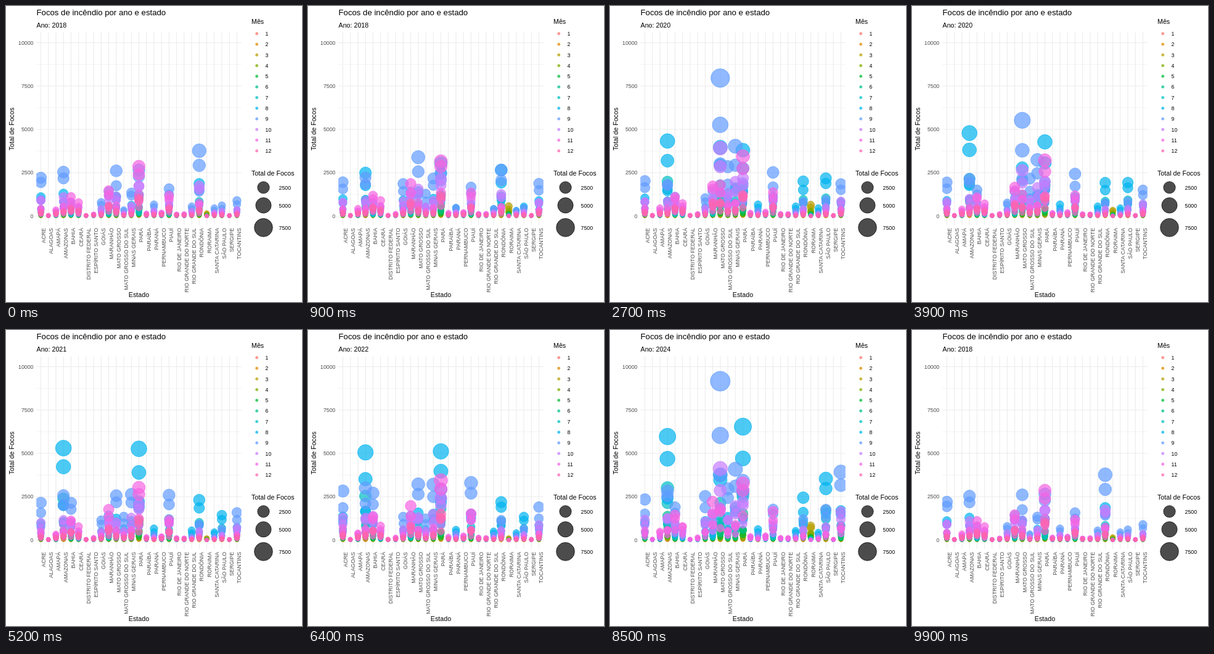
An HTML page for the animation above (10 s loop, 480x480 px).

```html
<!DOCTYPE html>
<html lang="pt">
<head>
<meta charset="utf-8">
<title>Focos de incêndio por ano e estado</title>
<style>
  html, body { margin: 0; width: 100%; height: 100%; overflow: hidden; background: #fff; }
  svg { display: block; width: 480px; height: 480px; font: 10.7px "Liberation Sans", Arial, sans-serif; }
  .title { font-size: 13.2px; }
  .small { font-size: 8.8px; }
  .axis { font-size: 8.8px; fill: #4d4d4d; }
  .end { text-anchor: end; }
  .mid { text-anchor: middle; }
  line { stroke: #ebebeb; stroke-width: 1.07; }
  .minor { stroke-width: .53; }
  .dot { fill-opacity: .7; stroke-opacity: .7; stroke-width: .94; }
</style>
</head>
<body>
<svg viewBox="0 0 480 480">
  <clipPath id="panel"><rect x="49.2" y="43" width="332.6" height="312"/></clipPath>
  <g id="grid"></g>
  <g id="dots" clip-path="url(#panel)"></g>
  <g id="labels"></g>
</svg>
<script>
const STATES = {
  AC: 'ACRE', AL: 'ALAGOAS', AP: 'AMAPÁ', AM: 'AMAZONAS', BA: 'BAHIA', CE: 'CEARÁ',
  DF: 'DISTRITO FEDERAL', ES: 'ESPÍRITO SANTO', GO: 'GOIÁS', MA: 'MARANHÃO',
  MT: 'MATO GROSSO', MS: 'MATO GROSSO DO SUL', MG: 'MINAS GERAIS', PA: 'PARÁ',
  PB: 'PARAÍBA', PR: 'PARANÁ', PE: 'PERNAMBUCO', PI: 'PIAUÍ', RJ: 'RIO DE JANEIRO',
  RN: 'RIO GRANDE DO NORTE', RS: 'RIO GRANDE DO SUL', RO: 'RONDÔNIA', RR: 'RORAIMA',
  SC: 'SANTA CATARINA', SP: 'SÃO PAULO', SE: 'SERGIPE', TO: 'TOCANTINS'
};
const COLORS = ['#F8766D', '#DE8C00', '#B79F00', '#7CAE00', '#00BA38', '#00C08B',
  '#00BFC4', '#00B4F0', '#619CFF', '#C77CFF', '#F564E3', '#FF64B0'];

// Dry-season peak of each year, 2018 to 2024; one number where it hardly varies
const DRY = {
  AC: [2200, 1700, 2100, 1780, 3000, 2100, 2360],
  AM: [2530, 3680, 4480, 5080, 5800, 4050, 6400],
  BA: [800, 700, 1220, 1780, 3000, 1500, 1940],
  GO: [780, 2930, 560, 940, 1570, 350, 2760],
  MT: [2600, 4170, 8900, 2130, 3550, 1850, 9970],
  MS: [350, 2200, 3000, 1300, 1400, 600, 3200],
  MG: [1340, 2980, 4280, 2180, 3680, 1270, 4390],
  PA: [2650, 4880, 3520, 5020, 5800, 4680, 7000],
  PI: [1570, 1750, 2700, 2150, 3600, 2050, 1740],
  RO: [3760, 3430, 1640, 2200, 2530, 1620, 2620],
  RR: [150, 970, 550, 100, 100, 100, 880],
  SP: [600, 850, 2500, 1350, 1620, 350, 3900],
  TO: [880, 2850, 1600, 1400, 2000, 1480, 4190],
  MA: 1400, PR: 650, RS: 550, SC: 450
};
const DRY_MONTH = { AM: 8, PA: 8, RO: 8, SP: 8, PR: 8, RS: 8, SC: 8, RR: 3 };

// End-of-year peak in November, scaled by the year
const LATE = {
  PA: 3600, MA: 2000, BA: 1400, PI: 1400, CE: 850, AP: 450, PE: 250, PB: 180,
  ES: 130, RJ: 130, RN: 120, DF: 40, AL: 40, SE: 35
};
const LATE_YEAR = [0.85, 1.1, 0.9, 0.85, 0.95, 1.3, 1.05];

const STARTS = [500, 2000, 3500, 5000, 6300, 7700, 9100];
const LOOP = 10000;
const ROWS = 3;

const $ = id => document.getElementById(id);
const xOf = i => 56.5 + 12.23 * i;
const yOf = v => 340.5 - v * 0.0281;
const rOf = v => 2.6 + 14.2 * Math.sqrt(v / 10083);

function add(parent, tag, attrs, text) {
  const el = document.createElementNS('http://www.w3.org/2000/svg', tag);
  for (const k in attrs) el.setAttribute(k, attrs[k]);
  if (text) el.textContent = text;
  parent.appendChild(el);
  return el;
}

function write(text, x, y, cls = '', turn = false) {
  const attrs = turn ? { transform: `translate(${x} ${y}) rotate(-90)` } : { x, y };
  return add($('labels'), 'text', { ...attrs, class: cls }, text);
}

function addDot(parent, cx, cy, r, color = '#000') {
  return add($(parent), 'circle', { cx, cy, r, fill: color, stroke: color, class: 'dot' });
}

let seed = 7;
function rand() {
  seed = (seed * 16807) % 2147483647;
  return seed / 2147483647;
}

function drawFrame() {
  const grid = $('grid');
  for (let v = 0; v <= 10000; v += 1250) {
    const major = v % 2500 === 0;
    add(grid, 'line', { x1: 49.2, x2: 381.8, y1: yOf(v), y2: yOf(v), class: major ? '' : 'minor' });
    if (major) write(String(v), 44.5, yOf(v) + 3.1, 'axis end');
  }
  Object.values(STATES).forEach((name, i) => {
    add(grid, 'line', { x1: xOf(i), x2: xOf(i), y1: 43, y2: 355 });
    write(name, xOf(i) + 7, 360, 'axis end', true);
  });
  write('Focos de incêndio por ano e estado', 49.5, 15, 'title');
  write('Estado', 215.5, 471.5, 'mid');
  write('Total de Focos', 13, 199.5, 'mid', true);
  write('Mês', 398, 28.5);
  COLORS.forEach((color, i) => {
    const cy = 44.8 + 17.28 * i;
    addDot('labels', 406.7, cy, 2, color);
    write(String(i + 1), 420.5, cy + 3.2, 'small');
  });
  write('Total de Focos', 398, 274.5);
  [[2500, 294.3], [5000, 323.3], [7500, 359.3]].forEach(([v, cy]) => {
    addDot('labels', 417.5, cy, rOf(v));
    write(String(v), 442.5, cy + 3.2, 'small');
  });
}

// Height of a season that rises and falls by a fixed ratio per month
const season = (peak, gap, rise, fall) => peak * (gap < 0 ? rise ** -gap : fall ** gap);

function count(code, year, month, row) {
  const lateYear = LATE_YEAR[year];
  const dry = DRY[code]?.[year] ?? DRY[code] ?? 0;
  let top = DRY_MONTH[code] ?? 9;
  // Fires come a month later in 2018 and 2023
  if (top === 8 && year % 5 === 0) top = 9;
  const high = Math.max(
    season(dry, month - top, 0.47, 0.47),
    season((LATE[code] ?? 0) * lateYear, month - 11, 0.65, 0.4)
  );
  const spread = month === top && row === 0 ? 1 : 0.8 + 0.3 * rand();
  return 5 + high * spread * (1 - 0.1 * row - 0.1 * row * row);
}

function makeDots() {
  const dots = [];
  for (let month = 1; month <= 12; month++) {
    Object.keys(STATES).forEach((code, i) => {
      for (let row = 0; row < ROWS; row++) {
        const values = STARTS.map((_, year) => count(code, year, month, row));
        dots.push({ el: addDot('dots', xOf(i), 0, 0, COLORS[month - 1]), month, values });
      }
    });
  }
  return dots;
}

drawFrame();
const yearLabel = write('Ano: 2018', 49.5, 34.7);
const dots = makeDots();

function show(time) {
  const from = Math.max(0, STARTS.findLastIndex(s => time >= s));
  const to = (from + 1) % STARTS.length;
  const steps = from === 6 ? 9 : 10;
  const step = Math.floor((time - STARTS[from]) / 100) + 1;
  const mix = Math.max(0, Math.min(1, step / steps));
  // The last year ends in November
  const noDecember = time >= 7700 && time < 9900;
  for (const { el, month, values } of dots) {
    const v = values[from] + (values[to] - values[from]) * mix;
    el.setAttribute('cy', yOf(v).toFixed(2));
    el.setAttribute('r', rOf(v).toFixed(2));
    el.style.display = noDecember && month === 12 ? 'none' : '';
  }
  yearLabel.textContent = 'Ano: ' + (2018 + (mix > 0.5 ? to : from));
}

let last = -1;
function tick() {
  const step = Math.floor((performance.now() % LOOP) / 100);
  if (step !== last) show((last = step) * 100);
  requestAnimationFrame(tick);
}
tick();
</script>
</body>
</html>
```
